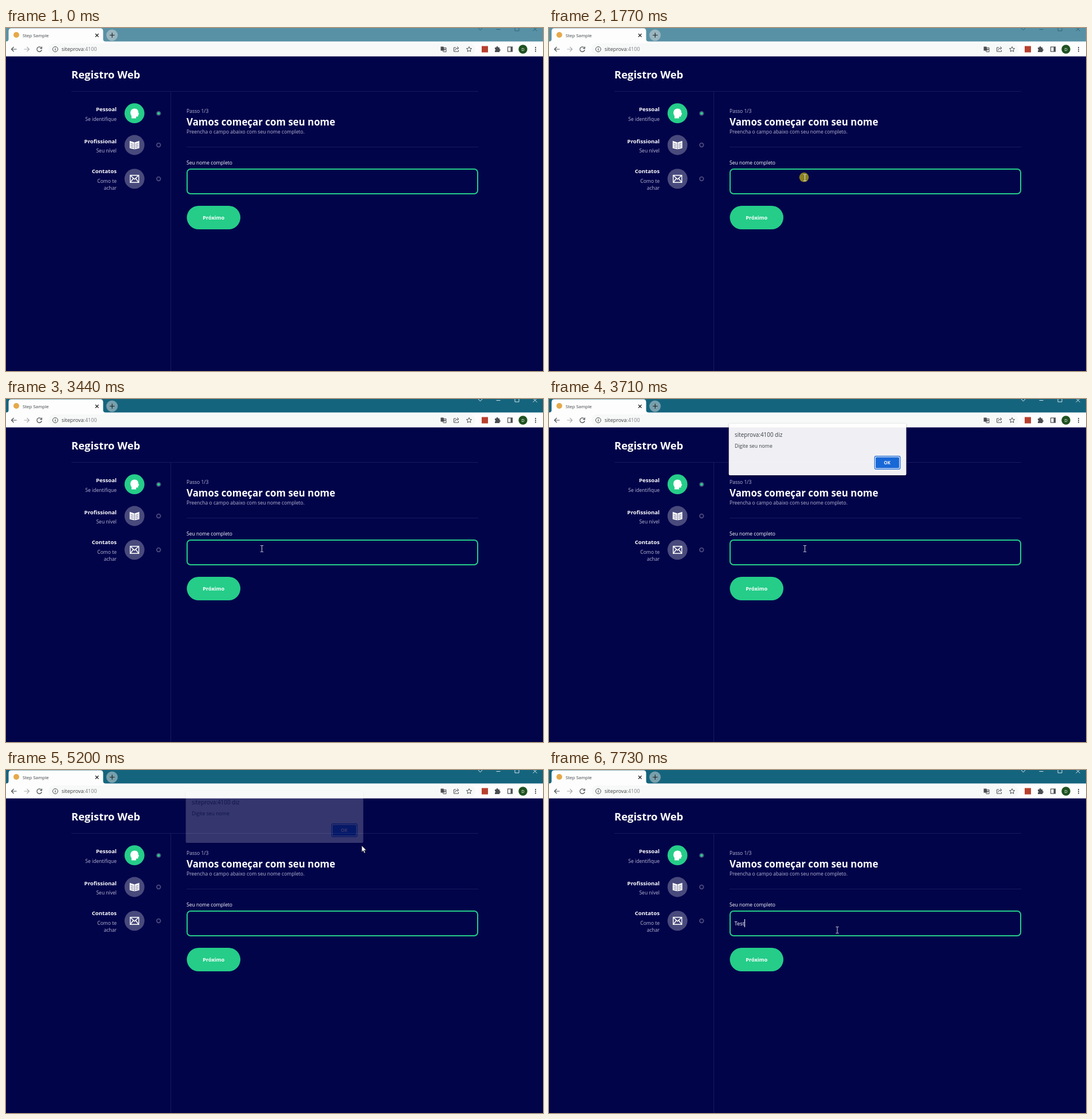
Animation of 937 by 598 pixels, one loop 8 s. Source, as an HTML page:

```html
<!DOCTYPE html>
<html lang="pt-BR">
<head>
<meta charset="utf-8">
<title>Step Sample</title>
<style>
  html, body { margin: 0; width: 100%; height: 100%; overflow: hidden; background: #02044a; }
  svg { display: block; width: 937px; height: 598px; font: 8.55px "Open Sans", "Noto Sans", sans-serif; fill: none; }
  text { fill: #b8b8d4; white-space: pre; }
  .b { font-weight: 700; }
  .w { fill: #fff; }
  .r { text-anchor: end; }
  .m { text-anchor: middle; }
  .ink text, text.ink { fill: #3c4043; }
  .line { stroke: #16195c; }
  .ui { stroke: #4a4e52; stroke-width: 1.2; }
  #dialog { filter: drop-shadow(0 1px 1.5px #0006); }
</style>
</head>
<body>
<svg viewBox="0 0 937 598">
  <rect width="937" height="598" fill="#02044a"/>

  <!-- browser window -->
  <rect id="bar" width="937" height="25"/>
  <g id="controls">
    <path d="M824 0l3.500 4 3.500-4M855.500 2.500h7M888-2v7h7v-7M919.500-1l7 6.500M926.500-1l-7 6.500"/>
  </g>
  <path d="M0 23.500q4.500 0 4.500-4V5.500q0-5 5-5h155q5 0 5 5v14q0 4 4.500 4h763v26H0z" fill="#fdfdfd"/>
  <rect x="74" y="27" width="745" height="20" rx="10" fill="#f7f8f8"/>
  <circle cx="18" cy="12" r="5" fill="#e5a94a"/>
  <text class="ink" x="29" y="15.500" font-size="7.900">Step Sample</text>
  <circle cx="185" cy="12.500" r="10" fill="#dadada" opacity=".5"/>
  <g class="ui">
    <path d="M156 10l5.500 5.500M161.500 10l-5.500 5.500M181 12.500h8.500M185.200 8.300v8.500" stroke="#222"/>
    <path d="M18.500 37H10M13.500 33l-4 4 4 4"/>
    <path d="M31.500 37H40M36.500 33l4 4-4 4" stroke="#a9acb0"/>
    <path d="M61.500 34.500a4.200 4.200 0 1 0 .8 3.500M62.500 32.500v3.200h-3.200"/>
    <circle cx="86" cy="37" r="4.500" stroke-width="1"/>
    <path d="M86 36.300v3M86 34.400v1"/>
    <path d="M758.500 32.500h5l1.500 7h-6.500z" fill="#4a4e52" stroke="none"/>
    <path d="M764 34.500h4v7h-5l-1-2M764.500 37h3M766 36v3" stroke-width="1"/>
    <path d="M785 34h-3.500v7h8v-2.500M783.500 39q.5-4 5-4M787 32.500l3 2.500-3 2.500" stroke-width="1"/>
    <path d="M808 32.500l1.300 3 3.300.3-2.500 2.200.8 3.200-2.900-1.700-2.900 1.700.8-3.200-2.500-2.200 3.300-.3z" stroke-width="1"/>
    <rect x="875.500" y="33" width="8" height="8"/>
  </g>
  <rect x="830" y="31.500" width="11" height="11" fill="#b8402f"/>
  <path d="M853 34h2.500a1.700 1.700 0 1 1 3.300 0h2.400v2.700a1.600 1.600 0 1 1 0 3.200v2.200h-8.200v-2.600a1.500 1.500 0 0 0 0-2.900zM880.500 33h3.500v8h-3.500z" fill="#4a4e52"/>
  <circle cx="902" cy="37" r="7.700" fill="#1f5221"/>
  <text class="w m" x="902" y="39.700" font-size="7.500">D</text>
  <path d="M924 33v8.500" stroke="#4a4e52" stroke-width="1.900" stroke-dasharray="1.900 1.400"/>
  <text class="ink" x="97" y="40.200" font-size="9">siteprova<tspan fill="#7a7e83">:4100</tspan></text>

  <!-- page -->
  <text class="b w" x="114" y="88.200" font-size="18.400">Registro Web</text>
  <path class="line" d="M114 110.500h710M287.500 110v488M315 207.500h509"/>
  <g class="r">
    <g class="b" font-size="9.650">
      <text class="w" x="193" y="145.300">Pessoal</text>
      <text class="w" x="193" y="200.700">Profissional</text>
      <text class="w" x="193" y="253.300">Contatos</text>
    </g>
    <text x="193" y="161.800">Se identifique</text>
    <text x="193" y="217.200">Seu nível</text>
    <text x="193" y="269.600">Como te</text>
    <text x="193" y="281.600">achar</text>
  </g>
  <g fill="#494a7c">
    <circle cx="224.200" cy="148.700" r="17.400" fill="#25cd89"/>
    <circle cx="224.200" cy="204" r="17.400"/>
    <circle cx="224.200" cy="262.800" r="17.400"/>
  </g>
  <g stroke="#494a7c" stroke-width="1.800">
    <circle cx="266.300" cy="148.900" r="3.300" fill="#25cd89"/>
    <circle cx="266.300" cy="204" r="3.300"/>
    <circle cx="266.300" cy="263" r="3.300"/>
  </g>
  <path class="w" d="M219 157.500v-4.300c-3.500-4-2.200-12.300 4.800-12.600 5.500-.1 7.200 3.500 7 6.500l1.400 3.200-1.500.9c0 3-.4 3.600-3.700 3.300v3z"/>
  <path class="w" d="M215.800 196.800l8.400 2.700 8.400-2.700v12.700l-8.400 2-8.400-2z"/>
  <path d="M224.200 199.500v12M217.500 201.500l5 1.200M217.500 204.300l5 1.200M217.500 207.100l5 1.200M230.900 201.500l-5 1.200M230.900 204.300l-5 1.200M230.900 207.100l-5 1.200" stroke="#494a7c" stroke-width=".8"/>
  <path d="M216.700 256.700h15v12.500h-15zl7.500 7 7.500-7M216.700 269.200l5.500-7M231.700 269.200l-5.500-7" stroke="#fff" stroke-width="1.400"/>

  <text x="315" y="148.200">Passo 1/3</text>
  <text class="b w" x="315" y="170" font-size="16.900">Vamos começar com seu nome</text>
  <text x="315" y="184.200">Preencha o campo abaixo com seu nome completo.</text>
  <text class="w" x="315" y="238.200">Seu nome completo</text>
  <rect x="316" y="246" width="507" height="43" rx="6" stroke="#25cd89" stroke-width="2"/>
  <text id="typed" class="w" x="323.500" y="271" font-size="9.400"></text>
  <rect id="caret" y="260" width="1" height="14" fill="#fff"/>
  <rect x="315.500" y="310" width="93.500" height="41" rx="20.500" fill="#25cd89"/>
  <text class="b w m" x="362.200" y="334.400" font-size="9.200">Próximo</text>

  <g id="dialog" class="ink">
    <rect x="313.700" y="47" width="309.700" height="90" rx="2" fill="#fff"/>
    <text x="324" y="69.700" font-size="9.900">siteprova:4100 diz</text>
    <text x="324" y="89.200" font-size="8.700">Digite seu nome</text>
    <rect x="568.200" y="103.700" width="44.600" height="22.600" rx="2.500" stroke="#1a6fe0" stroke-width="1.200"/>
    <rect id="ok" x="570" y="105.500" width="41" height="19" rx="1.500"/>
    <text class="b m" x="590" y="117.600" font-size="8" style="fill:#fff">OK</text>
  </g>

  <g id="pointer">
    <circle id="press" cx="-1.500" cy="-.700" r="8.300" fill="#8a8022"/>
    <path id="beam" d="M-2.500-5.500h2l.5.500.5-.500h2M0-5V5M-2.500 5.500h2l.5-.500.5.500h2" stroke="#e4e4ec" stroke-width=".9"/>
    <path id="arrow" d="M0 0v11l2.500-2.300 1.900 4.300 1.900-.8-1.900-4.200h3.500z" fill="#fff" stroke="#222" stroke-width=".8"/>
  </g>
</svg>
<script>
const LOOP = 8000;
const el = Object.fromEntries([...document.querySelectorAll('svg [id]')].map(e => [e.id, e]));

// [time, x, y]
const path = [
  [800, 690, 590], [1000, 606, 452], [1250, 495, 335], [1500, 443, 276],
  [1560, 443, 276], [1630, 446.5, 261], [4050, 446.5, 261], [4250, 530, 205],
  [4450, 655, 148], [4570, 674, 140], [4720, 640, 128], [4870, 605, 118],
  [5100, 605, 118], [5260, 630, 140], [5450, 560, 225], [5660, 501, 279],
  [5730, 501, 279], [5790, 503, 279]
];
// [time, opacity, vertical offset]
const dialogSteps = [
  [0, 0, -4], [3640, .45, -4], [3710, .94, -4], [3780, 1, 0],
  [5130, .6, -4], [5200, .2, -10], [5270, 0, -10]
];
const keyTimes = [7000, 7330, 7530, 7730];
const caretTimes = [1910, 2430, 2890, 3440, 6190, 6740, 7000];

const during = (t, from, to) => t >= from && t < to;
const passed = (times, t) => times.filter(time => time <= t).length;
const show = (node, on) => node.setAttribute('visibility', on ? 'inherit' : 'hidden');

function pointerAt(t) {
  const i = path.findIndex(p => p[0] > t);
  if (i < 0) return path.at(-1).slice(1);
  if (i === 0) return path[0].slice(1);
  const [a, b] = [path[i - 1], path[i]];
  const k = (t - a[0]) / (b[0] - a[0]);
  return [a[1] + (b[1] - a[1]) * k, a[2] + (b[2] - a[2]) * k];
}

function draw(t) {
  const active = t >= 1910;
  el.bar.setAttribute('fill', active ? '#15647e' : '#5891a5');
  el.controls.setAttribute('stroke', active ? '#d5e3e8' : '#326477');

  const [, opacity, dy] = dialogSteps[passed(dialogSteps.map(s => s[0]), t) - 1];
  show(el.dialog, opacity > 0);
  el.dialog.setAttribute('opacity', opacity);
  el.dialog.setAttribute('transform', `translate(0 ${dy})`);
  el.ok.setAttribute('fill', during(t, 4740, 5200) ? '#3b80e4' : '#1a6fe0');

  el.typed.textContent = 'Test'.slice(0, passed(keyTimes, t));
  const width = el.typed.textContent ? el.typed.getComputedTextLength() : 0;
  el.caret.setAttribute('x', Math.round(323.7 + width));
  show(el.caret, passed(caretTimes, t) % 2);

  const [x, y] = pointerAt(t);
  const overField = during(y, 246, 289);
  el.pointer.setAttribute('transform', `translate(${x} ${y})`);
  show(el.pointer, t >= 800);
  show(el.beam, overField);
  show(el.arrow, !overField);
  show(el.press, during(t, 1700, 1910) || during(t, 5855, 5920));
}

function tick(now) {
  draw(now % LOOP);
  requestAnimationFrame(tick);
}
draw(0);
requestAnimationFrame(tick);
</script>
</body>
</html>
```
